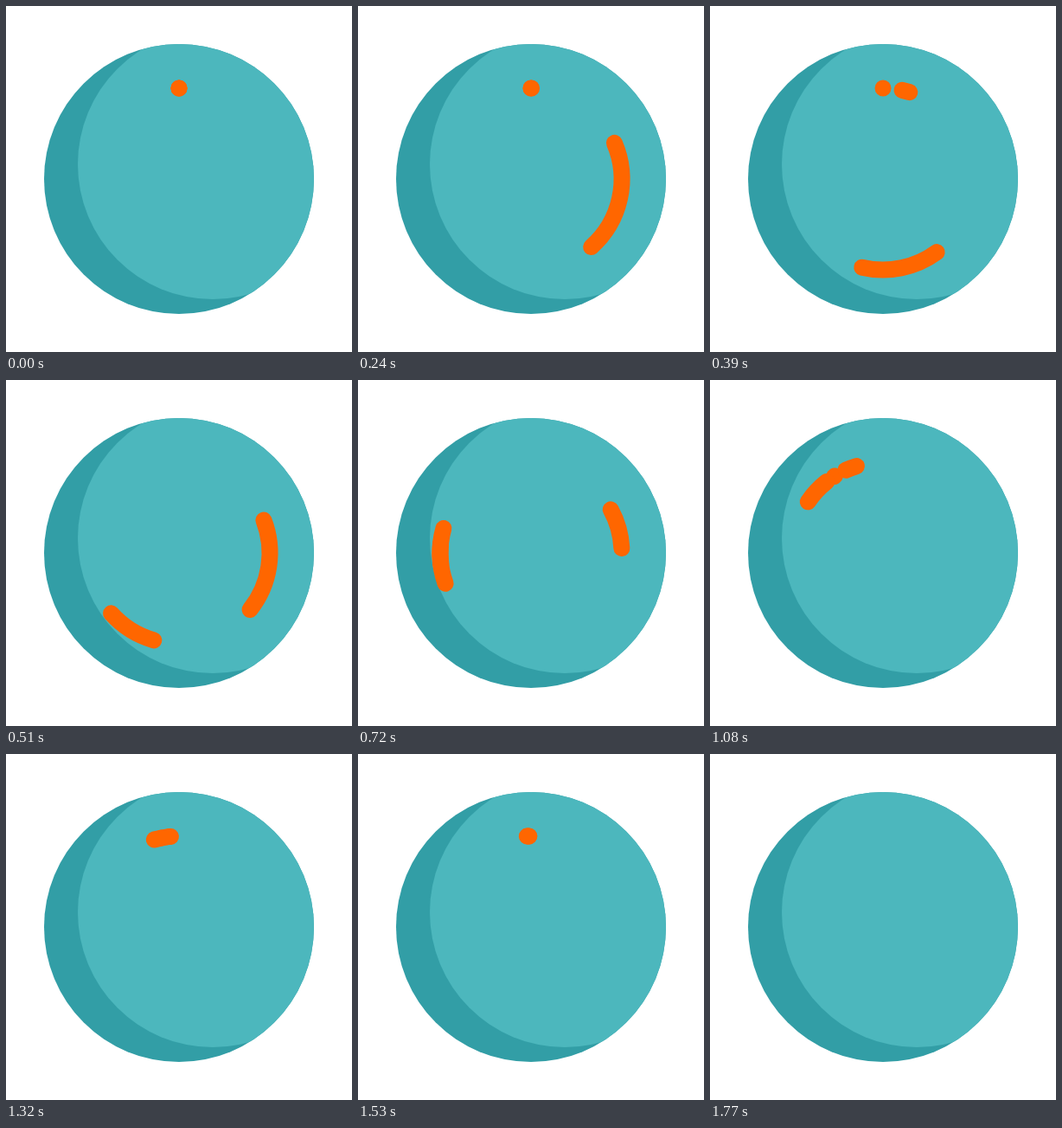
An HTML page with a canvas for the animation above (1800 ms loop, 400 by 400 pixels).

```html
<!DOCTYPE html>
<html lang="en">
<head>
<meta charset="utf-8">
<title>Loader</title>
<style>
  html, body { margin: 0; width: 100%; height: 100%; overflow: hidden; background: #fff; }
  canvas { display: block; width: 400px; height: 400px; }
</style>
</head>
<body>
<canvas id="stage" width="400" height="400"></canvas>
<script>
const ctx = document.getElementById('stage').getContext('2d');
const LOOP = 1800, STEP = 30, HIDE = 59;
const TAU = Math.PI * 2;

// Each end of a stroke: [start step, steps, bezier x1, bezier x2]
const arcs = [
  { tail: [0, 57, 0.2, 0.2],       head: [0, 58.3, 0, 0.2] },
  { tail: [8.2, 45.1, 0.404, -0.016], head: [6.94, 46, 0.458, -0.152] },
  { tail: [16.2, 40.2, 0.4, 0.03], head: [17, 34.9, 0.378, 0] }
];

// Cubic bezier easing with y1 = 0 and y2 = 1
function ease(x, x1, x2) {
  if (x <= 0) return 0;
  if (x >= 1) return 1;
  let lo = 0, hi = 1;
  for (let i = 0; i < 40; i++) {
    const u = (lo + hi) / 2, v = 1 - u;
    if (3 * v * v * u * x1 + 3 * v * u * u * x2 + u * u * u < x) lo = u;
    else hi = u;
  }
  return lo * lo * (3 - 2 * lo);
}

function angle(t, [start, span, x1, x2]) {
  const left = Math.max(0, (57.5 - t) / 13.5);
  const cap = 360 - 5.2 * left * left; // shared slow finish
  return Math.min(360 * ease((t - start) / span, x1, x2), Math.max(0, cap));
}

function disc(x, y, color) {
  ctx.fillStyle = color;
  ctx.beginPath();
  ctx.arc(x, y, 156, 0, TAU);
  ctx.fill();
}

function stroke(from, to) {
  const rad = deg => (deg - 90) * Math.PI / 180;
  ctx.beginPath();
  ctx.arc(200, 200, 105, rad(from), rad(Math.max(to, from + 0.02)));
  ctx.stroke();
}

function draw(t) {
  ctx.fillStyle = '#fff';
  ctx.fillRect(0, 0, 400, 400);
  disc(200, 200, '#329ea6');
  ctx.save();
  ctx.beginPath();
  ctx.arc(200, 200, 156, 0, TAU);
  ctx.clip();
  disc(239, 183, '#4cb7bd');
  ctx.restore();
  if (t >= HIDE) return;
  ctx.strokeStyle = '#ff6600';
  ctx.lineWidth = 19;
  ctx.lineCap = 'round';
  for (const { tail, head } of arcs) stroke(angle(t, tail), angle(t, head));
}

function tick() {
  draw(Math.floor((performance.now() % LOOP) / STEP));
  requestAnimationFrame(tick);
}
tick();
</script>
</body>
</html>
```
